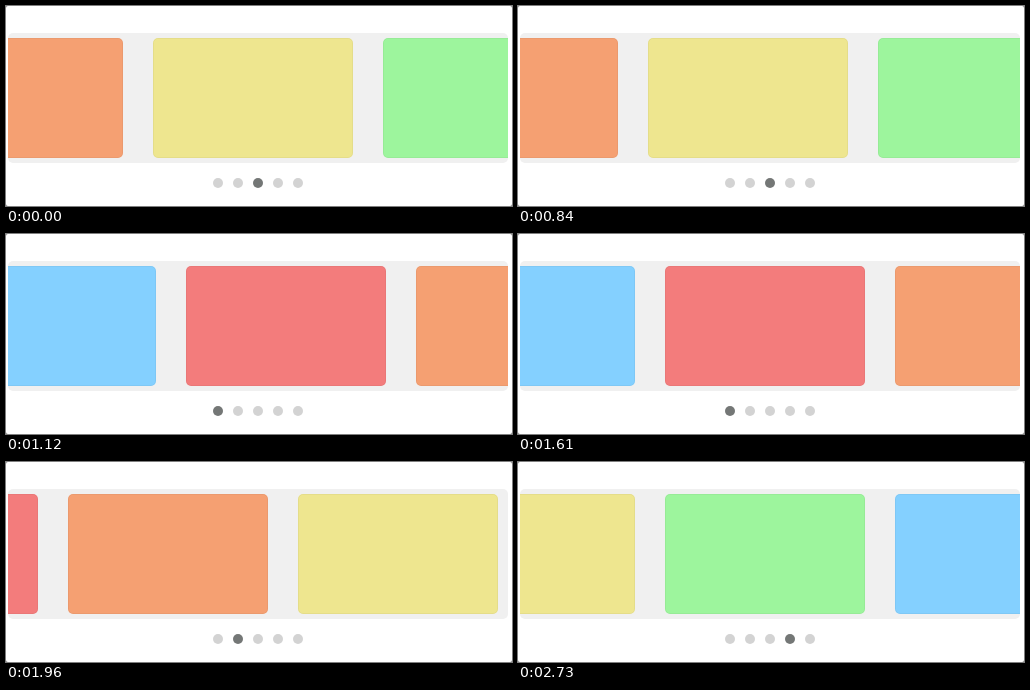
These frames come from a looping animation (506 px wide and 200 px high, 3.15 s). An HTML page with a canvas:

```html
<!DOCTYPE html>
<html lang="en">
<head>
<meta charset="utf-8">
<title>Carousel</title>
<style>
  html, body { margin: 0; width: 100%; height: 100%; overflow: hidden; background: #fff; }
  canvas { display: block; }
</style>
</head>
<body>
<canvas id="stage" width="506" height="200"></canvas>
<script>
const ctx = document.getElementById('stage').getContext('2d');

const LOOP = 3150, TICK = 70;
const CARD = { width: 200, height: 120, pitch: 230, x: 147, y: 32 };
const COLORS = ['#f37c7c', '#f5a072', '#eee68f', '#9df59d', '#84d0ff'];
const START_PAGE = 2;
const MOVE = { starts: [798, 1778], duration: 381, pages: 3 };
const DOT_LAG = 30;

const mod = (n, m) => ((n % m) + m) % m;
const clamp01 = v => Math.min(1, Math.max(0, v));
const easeInOut = x => x < 0.5 ? 2 * x * x : 1 - 2 * (1 - x) ** 2;

function pageAt(t) {
  return MOVE.starts.reduce(
    (page, start) => page + MOVE.pages * easeInOut(clamp01((t - start) / MOVE.duration)),
    START_PAGE);
}

function roundedPath(x, y, w, h, r) {
  ctx.beginPath();
  ctx.roundRect(x, y, w, h, r);
}

function fillRounded(color, ...box) {
  roundedPath(...box);
  ctx.fillStyle = color;
  ctx.fill();
}

function drawCards(page) {
  ctx.save();
  roundedPath(2, 27, 500, 130, 5);
  ctx.clip();
  const nearest = Math.round(page);
  for (let i = nearest - 2; i <= nearest + 2; i++) {
    const x = Math.round(CARD.x + (i - page) * CARD.pitch);
    fillRounded(COLORS[mod(i, COLORS.length)], x, CARD.y, CARD.width, CARD.height, 5);
    roundedPath(x + 0.5, CARD.y + 0.5, CARD.width - 1, CARD.height - 1, 4.5);
    ctx.strokeStyle = 'rgba(0, 0, 0, 0.04)';
    ctx.stroke();
  }
  ctx.restore();
}

function drawDots(active) {
  COLORS.forEach((_, i) => {
    ctx.beginPath();
    ctx.arc(212 + i * 20, 177, 5, 0, Math.PI * 2);
    ctx.fillStyle = i === active ? '#747776' : '#d3d3d3';
    ctx.fill();
  });
}

function draw(t) {
  ctx.fillStyle = '#777';
  ctx.fillRect(0, 0, 506, 200);
  fillRounded('#fff', 0, 0, 506, 200, 2);
  fillRounded('#f0f0f0', 2, 27, 500, 130, 5);
  drawCards(pageAt(t));
  drawDots(mod(Math.round(pageAt(t - DOT_LAG)), COLORS.length));
}

const origin = performance.now();
function frame() {
  const t = (performance.now() - origin) % LOOP;
  draw(Math.floor(t / TICK) * TICK);
  requestAnimationFrame(frame);
}
frame();
</script>
</body>
</html>
```
